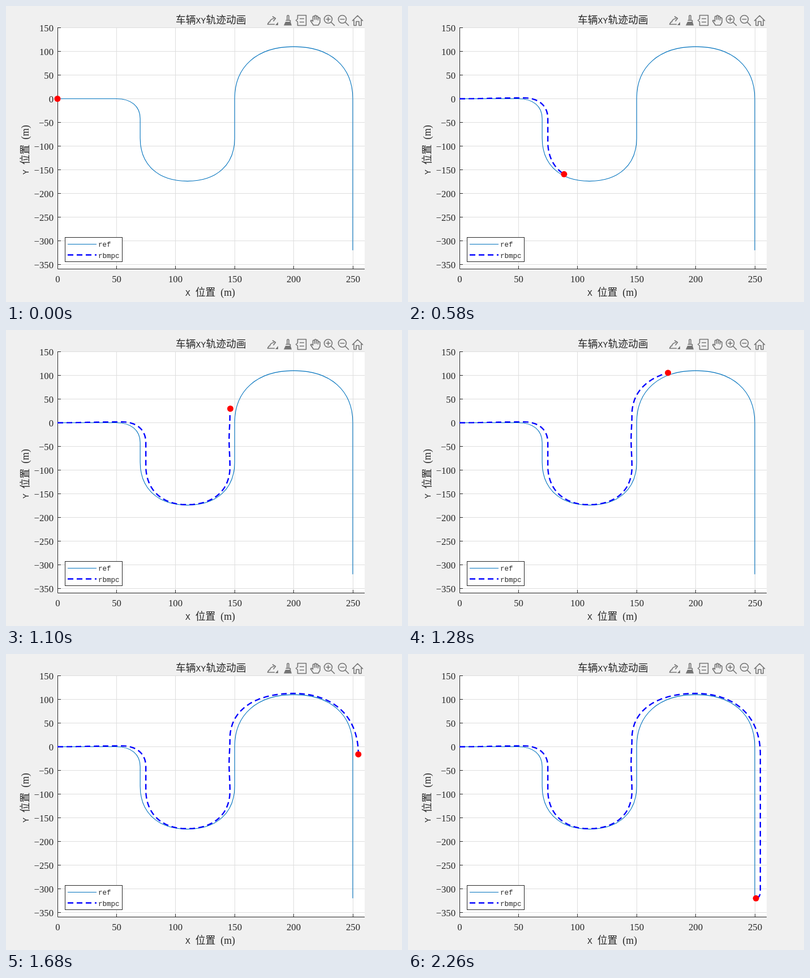
Animation, 700 px wide and 525 px high, one loop 2.28 s. Source, as an HTML page:

```html
<!DOCTYPE html>
<html lang="zh">
<head>
<meta charset="utf-8">
<style>
  html, body { margin: 0; width: 100%; height: 100%; overflow: hidden; background: #f0f0f0; }
  svg { display: block; width: 700px; height: 525px; }
  text { fill: #262626; font: 14.8px "Liberation Mono", monospace; white-space: pre; }
  .cjk { font: 300 17.8px "Noto Sans CJK SC", "Noto Sans CJK", sans-serif; }
  .tick { font: 16.7px "Liberation Serif", serif; }
  .unit { font: 17.8px "Liberation Serif", serif; }
  .legend { font-size: 12.5px; }
  .ref { fill: none; stroke: #0072bd; stroke-width: 1.1; }
  .track { fill: none; stroke: #00f; stroke-width: 2.4; stroke-dasharray: 10 6; }
  .icons { fill: none; stroke: #747474; stroke-width: 1.6; stroke-linejoin: round; }
  .icons .solid { fill: #747474; stroke: none; }
</style>
</head>
<body>
<svg viewBox="0 0 700 525">
  <defs>
    <g id="position">
      <text class="cjk" x="17.8">位置</text>
      <text class="unit" x="62.3">(m)</text>
    </g>
  </defs>
  <rect x="91" y="39" width="543" height="428" fill="#fff"/>
  <g id="grid" stroke="#dedede"></g>
  <path d="M91.5 39V466.5H634" fill="none" stroke="#262626"/>
  <g id="ticks" stroke="#262626"></g>
  <g id="labels"></g>

  <text class="cjk" x="300" y="31">车辆</text>
  <text x="335.6" y="30.5">XY</text>
  <text class="cjk" x="353.5" y="31">轨迹动画</text>
  <g transform="translate(317 514)"><text>X</text><use href="#position"/></g>
  <g transform="translate(40 299) rotate(-90)"><text>Y</text><use href="#position"/></g>

  <g class="icons">
    <path d="M465 28L462.5 32.5H475M466 29Q467 23 474 22M471 18.5L476.5 22L472.5 27"/>
    <path class="solid" d="M476 34H481V28.5Z"/>
    <path d="M497 25V17.500Q498.500 15.500 500 17.500V25M494.500 25.500H502.500V28"/>
    <path class="solid" d="M494 28H503L505 34.5H491Z"/>
    <path d="M515.5 16.5H530.5V34.5H515.5V28L512.5 25.5L515.5 23ZM519 22.5H527M519 28.5H527"/>
    <path d="M543.5 34L538.5 26.5Q539 24 542.5 27V19Q544 17 545.5 19V24V17.5Q547 15.5 548.5 17.5V24V18.5Q550 17 551.5 19V25V21.5Q553.5 19.5 555 22V29L552 34Z"/>
    <circle cx="569.5" cy="23.5" r="7"/>
    <path d="M574.5 28.5L581 35M565.5 23.5H573.5M569.5 19.5V27.5"/>
    <circle cx="594.5" cy="23.5" r="7"/>
    <path d="M599.5 28.5L606 35M590.5 23.5H598.5"/>
    <path d="M612 26.5L621.5 17L631 26.5M615 24.5V34.5H619V27.5H624V34.5H628V24.5"/>
  </g>

  <path id="ref" class="ref"/>
  <rect x="104.5" y="410.5" width="101" height="43" fill="#fff" stroke="#262626"/>
  <path class="ref" d="M109 422.5H160"/>
  <path class="track" d="M109 441.5H160"/>
  <text class="legend" x="163" y="427">ref</text>
  <text class="legend" x="163" y="447">rbmpc</text>

  <polyline id="track" class="track"/>
  <circle id="car" r="5.5" fill="red"/>
</svg>
<script>
const LOOP = 2280, STEP = 20, ROUNDNESS = 0.62;
const byId = id => document.getElementById(id);
const add = (id, markup) => byId(id).insertAdjacentHTML("beforeend", markup);
const toX = v => 91 + v * 2.088;
const toY = v => 164.5 - v * 0.84;

for (let v = 0; v <= 250; v += 50) {
  const x = Math.floor(toX(v)) + 0.5;
  if (v) add("grid", `<path d="M${x} 39V466"/>`);
  add("ticks", `<path d="M${x} 466V461"/>`);
  add("labels", `<text class="tick" text-anchor="middle" x="${x}" y="490">${v}</text>`);
}
for (let v = -350; v <= 150; v += 50) {
  const y = toY(v);
  add("grid", `<path d="M92 ${y}H634"/>`);
  add("ticks", `<path d="M91 ${y}H97"/>`);
  add("labels", `<text class="tick" text-anchor="end" x="84" y="${y + 6}">${String(v).replace("-", "−")}</text>`);
}

// A waypoint in axis units, its heading ("h" or "v") and the time it is passed
const waypoint = (x, y, heading, time) => ({ x: toX(x), y: toY(y), heading, time });

const road = [
  waypoint(0, 0, "h"), waypoint(50, 0, "h"), waypoint(70, -42, "v"),
  waypoint(70, -83, "v"), waypoint(110, -174, "h"), waypoint(150, -83, "v"),
  waypoint(150, 0, "v"), waypoint(200, 110, "h"), waypoint(250, 0, "v"),
  waypoint(250, -320, "v")
];
const drive = [
  waypoint(0, 0, "h", 0), waypoint(54.6, 1.8, "h", 150), waypoint(74.8, -42, "v", 250),
  waypoint(74.8, -90, "v", 415), waypoint(109.7, -173, "h", 685),
  waypoint(146, -93, "v", 880), waypoint(145.3, -36, "v", 990), waypoint(146, 17, "v", 1080),
  waypoint(199.7, 112.5, "h", 1350), waypoint(254.7, -16, "v", 1680),
  waypoint(254.7, -304, "v", 2140), waypoint(251, -320, "h", 2260)
];

// Cubic control points: straights run evenly, turns are rounded corners
function controls(a, b) {
  const k = a.heading === b.heading ? 1 / 3 : ROUNDNESS;
  const handle = (p, sign) => p.heading === "h"
    ? [p.x + sign * k * (b.x - a.x), p.y]
    : [p.x, p.y + sign * k * (b.y - a.y)];
  return [[a.x, a.y], handle(a, 1), handle(b, -1), [b.x, b.y]];
}

function position(t) {
  const i = Math.max(1, drive.findIndex(p => p.time >= t));
  const a = drive[i - 1], b = drive[i];
  const u = (t - a.time) / (b.time - a.time), w = 1 - u;
  const [p, q, r, s] = controls(a, b);
  return [0, 1].map(k =>
    w * w * w * p[k] + 3 * w * w * u * q[k] + 3 * w * u * u * r[k] + u * u * u * s[k]);
}

byId("ref").setAttribute("d", `M${road[0].x} ${road[0].y}` +
  road.slice(1).map((p, i) => "C" + controls(road[i], p).slice(1).join(" ")).join(""));

function draw(now) {
  const t = Math.floor(now % LOOP / STEP) * STEP;
  const points = [];
  for (let s = 0; s <= t; s += 5) points.push(position(s));
  const [x, y] = points[points.length - 1];
  byId("track").setAttribute("points", points.join(" "));
  byId("car").setAttribute("cx", x);
  byId("car").setAttribute("cy", y);
}

const start = performance.now();
function tick() {
  draw(performance.now() - start);
  requestAnimationFrame(tick);
}
tick();
</script>
</body>
</html>
```
